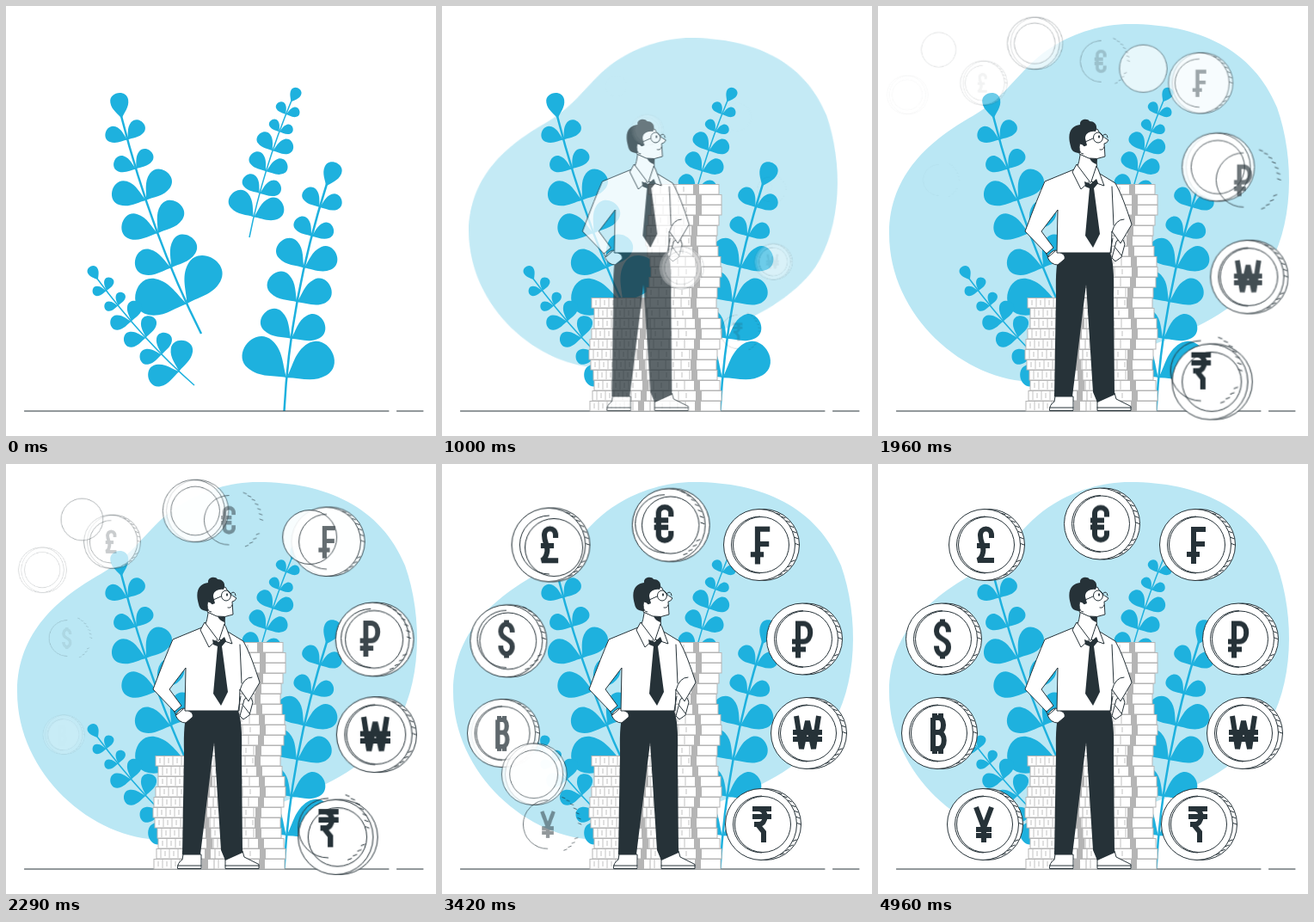
An HTML page for the animation above (5 s loop, 500 by 500 pixels).

```html
<!DOCTYPE html>
<html lang="en">
<head>
<meta charset="utf-8">
<title>Currency coins</title>
<style>
  html, body { margin: 0; width: 100%; height: 100%; overflow: hidden; background: #fff; }
  svg { display: block; width: 100%; height: 100%; }
  .ink { fill: none; stroke: #263238; stroke-width: 1; stroke-linecap: round; stroke-linejoin: round; }
  .paper { fill: #fff; stroke: #263238; stroke-width: 1; stroke-linejoin: round; }
  .dark { fill: #263238; }
  .sign { fill: none; stroke: #263238; stroke-width: 6; }
  .leaf { fill: #1eb1de; }
  .stem { fill: none; stroke: #1eb1de; }
  .row { fill: #fff; stroke: #b5b5b5; stroke-width: 1; }
  .band { fill: #b5b5b5; }
  .ridge { fill: none; stroke: #c2c2c2; stroke-width: 1; }
</style>
</head>
<body>
<svg viewBox="0 0 500 500" xmlns="http://www.w3.org/2000/svg">
  <path id="blob" fill="#bae7f4" d="M293 21C372 21 436 50 464 118C485 178 484 258 450 310C422 349 374 374 330 390C285 406 260 437 182 437C100 437 13 360 13 265C13 195 62 155 110 128C155 102 165 70 205 46C230 31 260 21 293 21Z"/>
  <g id="plants"></g>
  <path class="ink" d="M21.500 471H445M454.500 471H485"/>
  <g id="stacks"></g>
  <g id="man">
    <path class="paper" d="M206 454H227V470.500H199.500Q199 464 205 460ZM255 456L275 450 277 457 294 465.500V470.500H255Z"/>
    <path class="ink" d="M199.500 467H227M255 467H294"/>
    <path class="dark" d="M211 287H270Q275 300 274 335L275 452 255 461 250 449 242 324 226 454H205L207 335Q206 301 211 287Z"/>
    <path class="paper" d="M197 292Q202 284 207 284L216 289Q219 294 215 296L209 301Q201 301 197 292ZM277 274Q282 269 285 272L287 277 283 292 276 297 272 293Z"/>
    <path class="paper" d="M228 190L194 204Q186 222 171 262L196 288 204 281 190 262 209 237 208 287H271L272 262 282 276 295 254Q285 222 276 206L253 192Z"/>
    <path class="ink" d="M272 210L274 255M272 263Q276 248 286 248M195 287L198 292 206 285M276 281L283 290M273 270L270 287"/>
    <path class="paper" d="M236 168Q234 182 231 190L244 208 255 197 254 178Z"/>
    <path class="paper" d="M231 184L226 193 236 213 246 204ZM254 186L248 204 263 209 256 190Z"/>
    <path class="dark" d="M240 204L247 207 254 201 256 206 251 212 258 265 250 281 241 267 246 212 241 210Z"/>
    <path class="paper" d="M238 148L255 143Q259 151 268 156 266 160 263 160L264 175Q255 179 245 177L234 172Z"/>
    <path class="dark" d="M246 177L255 178 254 184Q248 182 246 177ZM224 163C219 146 226 139 235 138C234 131 244 130 246 134C253 134 256 140 253 146C245 145 241 149 241 154L243 162 238 164 235 171C229 171 225 169 224 163Z"/>
    <path class="paper" d="M240 163Q234 157 234 164 234 172 239 172"/>
    <ellipse class="ink" cx="256" cy="153" rx="5.500" ry="6"/>
    <path class="ink" d="M261 151Q266 146 267 153M250 154L241 158M258 167Q262 168 263 164"/>
    <ellipse class="dark" cx="257" cy="152" rx="1" ry="1.800"/>
  </g>
  <g id="coins"></g>
</svg>
<script>
const LOOP = 5000;
const EASE = 'cubic-bezier(.36,-.01,.5,1.38)';
const byId = id => document.getElementById(id);
const radians = degrees => degrees * Math.PI / 180;
let css = '', ruleCount = 0;

function add(parent, tag, attrs = {}) {
  const el = document.createElementNS('http://www.w3.org/2000/svg', tag);
  for (const key in attrs) el.setAttribute(key, attrs[key]);
  return parent.appendChild(el);
}

// Fades an element in while it moves from the given transform to rest, then holds.
function enter(el, start, duration, from, to, origin = [0, 0]) {
  const name = 'enter' + ruleCount++;
  const pct = ms => (ms / LOOP * 100).toFixed(2) + '%';
  css += `@keyframes ${name}{0%,${pct(start)}{opacity:0;transform:${from};animation-timing-function:${EASE}}` +
    `${pct(start + duration)},100%{opacity:1;transform:${to}}}`;
  el.style.transformOrigin = `${origin[0]}px ${origin[1]}px`;
  el.style.animation = `${name} ${LOOP}ms linear infinite`;
}
const zoom = (el, start, duration, origin) =>
  enter(el, start, duration, 'scale(.5)', 'scale(1)', origin);

// One plant design: leaf pairs that grow down a curved stem from tip to foot.
const LEAF = 'M0 0C.2-.11.38-.35.68-.35C1.1-.35 1.1.35.68.35C.38.35.2.11 0 0Z';
const PAIR_LENGTHS = [27, 27, 41, 43, 43, 61];
const LEAF_SPREAD = 54;

function plant(scale, tip, bend, foot) {
  const group = byId('plants');
  const at = (t, k) => (1 - t) ** 2 * tip[k] + 2 * t * (1 - t) * bend[k] + t * t * foot[k];
  const slope = (t, k) => (1 - t) * (tip[k] - bend[k]) + t * (bend[k] - foot[k]);
  const leaf = (t, turn, length) => {
    const angle = Math.atan2(slope(t, 1), slope(t, 0)) * 180 / Math.PI + turn;
    add(group, 'path', { class: 'leaf', d: LEAF,
      transform: `translate(${at(t, 0)} ${at(t, 1)}) rotate(${angle}) scale(${length * scale})` });
  };
  add(group, 'path', { class: 'stem', d: `M${tip}Q${bend} ${foot}`, 'stroke-width': 2.5 * scale });
  leaf(.01, 6, 30);
  PAIR_LENGTHS.forEach((length, i) => {
    const t = .1 + .12 * i + .006 * i * i;
    leaf(t, -LEAF_SPREAD, length);
    leaf(t, LEAF_SPREAD, length);
  });
}
plant(1, [134, 128], [169.5, 267], [227, 381]);
plant(.61, [332, 110], [298.5, 190.5], [283, 269]);
plant(1, [373, 207], [330, 342], [323.5, 471]);
plant(.6, [106, 317], [159.5, 389], [219, 441]);

// Banknote stacks: rows of 12 px with a paper band and short ridges.
function stack(left, right, top, band, step) {
  const group = byId('stacks');
  for (let i = 0, y = top; y < 470; i++, y += 12) {
    const shift = i ? Math.round(Math.sin(i * 7.3) * 3) : 0;
    const row = { y: y + .5, height: 11.5 };
    add(group, 'rect', { class: 'row', x: left + shift, width: right - left, ...row });
    let ridges = '';
    for (let x = left + 5 + shift, n = i; x < band - 3; x += step, n++) {
      ridges += n % 2 ? `M${x} ${y + 1}v10` : `M${x} ${y + 3}v6`;
    }
    add(group, 'path', { class: 'ridge', d: ridges });
    add(group, 'rect', { class: 'band', x: band + shift, width: 7, ...row });
  }
}
stack(174, 256, 339, 230, 5);
stack(240, 322, 207, 292, 9);

// Strokes of each sign, around its centre, in order of appearance.
const signs = {
  rupee: 'M-11-18H11M-11-9H11M-8-18H-4C6-18 6 0-4 0H-9M-6-1L2 9V21',
  won: 'M-13-20L-7 18 0-14 7 18 13-20M-17-1H17M-17 7H17',
  ruble: 'M-6 22V-18H0C11-18 11 3 0 3H-13M-13 12H3',
  franc: 'M-3 22V-18H11M-3-1H10M-11 11H4',
  euro: 'M7-8V-12C7-21-7-21-7-12V12C-7 21 7 21 7 12V8M-12-4H4M-12 4H4',
  pound: 'M7-8V-11C7-21-6-21-6-11C-6-3-1 2-3 9C-4 14-7 17-9 18H10M-10 1H5',
  dollar: 'M7-8C7-21-7-21-7-9C-7 1 7-1 7 9C7 21-7 21-7 8M0-23V-16M0 16V23',
  bitcoin: 'M-6-18V18H0C9 18 9-1 0-1H-6M-6-18H0C8-18 8-1 0-1M-4-23V-18M3-23V-18M-4 18V24M3 18V24',
  yen: 'M-9-20L0 4 9-20M0 0V21M-9 6H9M-9 13H9',
};
// Distance from the middle line and height of each place, bottom to top; both sides mirror.
const places = [[124.5, 419], [177.5, 313], [172.5, 203.5], [122.5, 94], [11.5, 69.5]];
const MIDDLE = 249, TOP_COIN = 4;
const COIN_TIME = 2500, COIN_GAP = 275, SIGN_LAG = 260;
const RADIUS = 41.5;

function rimTicks(x, y) {
  let d = '';
  for (let a = -62; a < 60; a += 10) {
    if (a > 0 && a < 25) continue;
    d += `M${x + RADIUS * Math.cos(radians(a))} ${y + RADIUS * Math.sin(radians(a))}l4 ${a < 0 ? 1.5 : -1.5}`;
  }
  return d;
}

function coin(strokes, i) {
  const start = i * COIN_GAP;
  const fromTop = Math.abs(i - TOP_COIN);
  const [distance, y] = places[TOP_COIN - fromTop];
  const x = MIDDLE + (i > TOP_COIN ? -distance : distance);
  const group = add(byId('coins'), 'g');
  const corner = [0, 0], centre = [x, y];
  const piece = (tag, attrs, origin, delay = 0) =>
    zoom(add(group, tag, attrs), start + delay, COIN_TIME, origin);
  const circle = (dx, r, origin) =>
    piece('circle', { class: 'paper', cx: x + dx, cy: y, r }, origin);

  // Every second coin flies in from the corner; beside the top one only the ring does.
  const flies = i % 2 === 0;
  const ringFlies = flies || fromTop === 1;
  circle(2.5, RADIUS, flies ? corner : centre);
  circle(-2.5, RADIUS, flies ? corner : centre);
  circle(-.5, 32.5, ringFlies ? corner : centre);
  piece('path', { class: 'ink', d: `M${x - 2} ${y - 33}A33 33 0 0 0 ${x - 2} ${y + 33}` + rimTicks(x - 2, y) }, centre);

  const holder = add(group, 'g', { transform: `translate(${x - 1.5} ${y})` });
  zoom(add(holder, 'path', { class: 'sign', d: strokes }), start + SIGN_LAG, COIN_TIME, corner);
}
Object.values(signs).forEach(coin);

zoom(byId('coins'), 0, COIN_TIME, [MIDDLE, 245]);
zoom(byId('blob'), 0, 1800, [246, 229]);
zoom(byId('stacks'), 40, 680, [248, 339]);
enter(byId('man'), 60, 1880, 'translateX(-30px)', 'translateX(0px)');
add(document.head, 'g').remove();
document.head.appendChild(document.createElement('style')).textContent = css;
</script>
</body>
</html>
```
